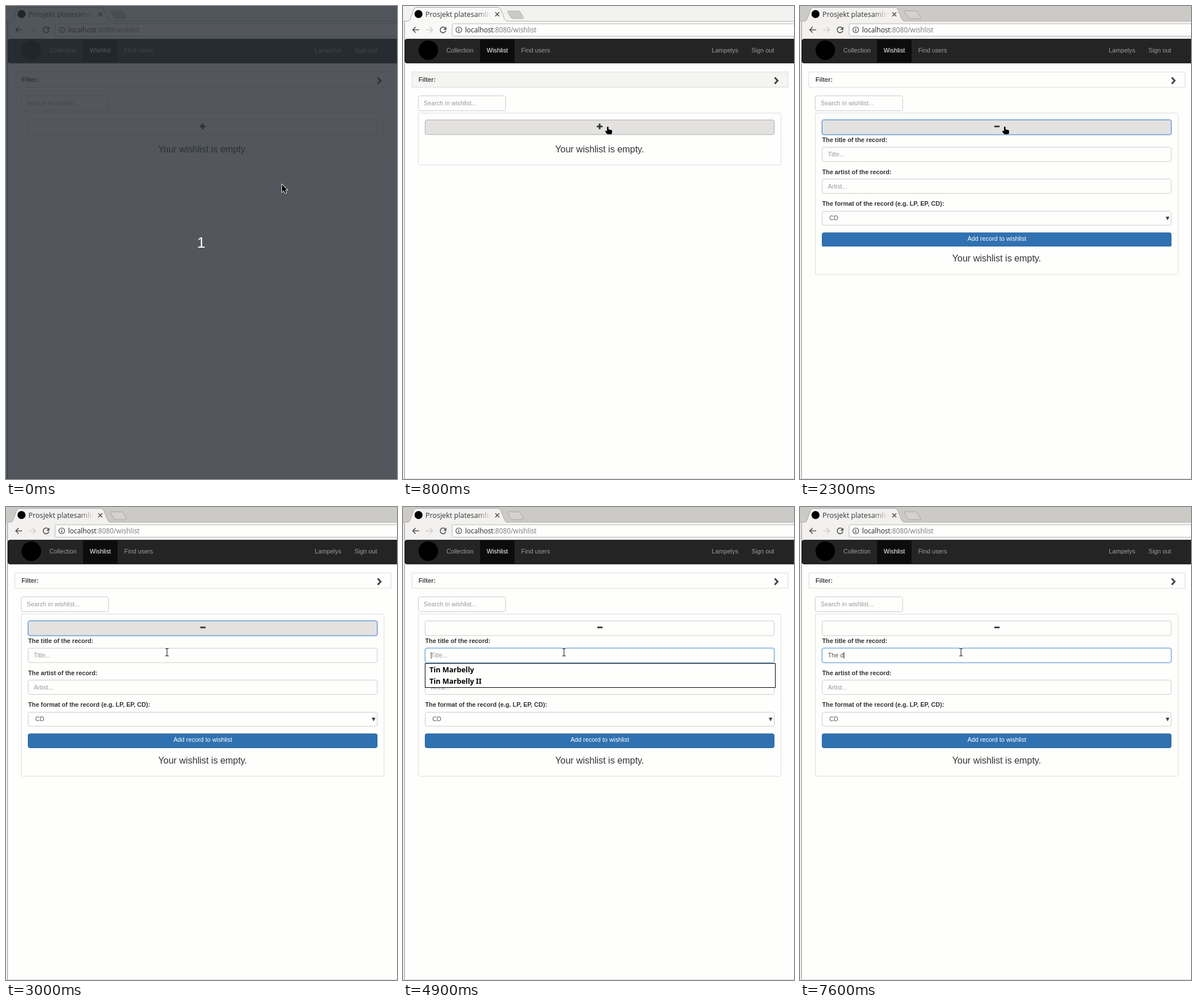
Recreate the animation shown at these times as an HTML page. Size 680 by 824 pixels, loop 8 s.

```html
<!DOCTYPE html>
<html lang="en">
<head>
<meta charset="utf-8">
<title>Wishlist</title>
<style>
  html, body { margin: 0; width: 100%; height: 100%; overflow: hidden; background: #fefefd; }
  svg { display: block; width: 680px; height: 824px; }
  text { font: 10.75px "Liberation Sans", Arial, sans-serif; fill: #9d9d9d; white-space: pre; }
  .mid { text-anchor: middle; }
  .label { font-weight: bold; fill: #333; }
  .value { fill: #555; }
  .hint { fill: #999; }
  .chrome { font-family: "Open Sans", "Noto Sans", sans-serif; }
  .option { font: bold 12.5px "Noto Sans", sans-serif; fill: #000; }
  .box { fill: #fefefd; stroke: #ccc; }
  .panel { fill: #fefefd; stroke: #ddd; }
  .line { fill: none; stroke: #505050; stroke-width: 1.6; }
  #strip { fill: #cbcac7; }
  .bar { fill: #f2f1f0; }
  #newTab { fill: #d3d2d0; stroke: #a8a6a3; }
  .idle #strip { fill: #f2f2f1; }
  .idle .bar { fill: #f8f8f7; }
  .idle #newTab { fill: #cbcac8; stroke: #bab9b7; }
  #filter.hover { fill: #f4f4f3; }
  #toggle.hover { fill: #e3e2e1; stroke: #adadad; }
  #toggle.focus { fill: #e3e2e1; stroke: #5b8bd0; }
  #title.warm { stroke: #a3bddb; }
  #title.focus { stroke: #5f9fd6; }
  .glow { fill: none; stroke: #8fbfea; stroke-width: 3; }
</style>
</head>
<body>
<svg id="stage" viewBox="0 0 680 824">
  <defs>
    <linearGradient id="fade" gradientUnits="userSpaceOnUse" x1="128" x2="153" y1="0" y2="0">
      <stop stop-color="#333"/><stop offset="1" stop-color="#333" stop-opacity="0"/>
    </linearGradient>
    <clipPath id="fold"><rect id="foldBox" x="30" y="228" width="624" height="0"/></clipPath>
  </defs>

  <!-- browser window -->
  <rect width="680" height="824" fill="#fefefd"/>
  <rect id="strip" width="680" height="27"/>
  <rect class="bar" y="27" width="680" height="31"/>
  <path d="M0 26.5H680" stroke="#b4b3b0"/>
  <path class="bar" d="M7 27.5C11 26 12 24 13 21L18.500 6Q19.500 2.500 23 2.500H165Q168.500 2.500 170 6L176 21C177.500 25 179 26.500 183 27.500Z"/>
  <path d="M7 26.500C11 26 12 24 13 21L18.500 6Q19.500 2.500 23 2.500H165Q168.500 2.500 170 6L176 21C177.500 25 179 26 183 26.500" fill="none" stroke="#a9a8a6"/>
  <path id="newTab" d="M183 8.500H201Q203 8.500 204 10.500L209.500 20Q210.500 22 208 22H190.500Q188.500 22 187.500 20L182 10.500Q181 8.500 183 8.500Z"/>
  <circle cx="27" cy="14" r="7"/>
  <text class="chrome" x="39" y="18.500" style="font-size:12.4px;fill:url(#fade)">Prosjekt platesamling</text>
  <path class="line" d="M160.500 11l7 7m0-7l-7 7"/>
  <path class="line" d="M28 41.500H17.500M22 36.500l-5 5 5 5"/>
  <path class="line" d="M40 41.500H51M46.500 36.500l5 5-5 5" style="stroke:#cfcecc"/>
  <path class="line" d="M73.500 38.300A5 5 0 1 0 74.500 43"/>
  <path d="M75.500 36v5.500H70Z" fill="#505050"/>
  <rect x="85.500" y="31" width="620" height="21.500" rx="2.500" fill="#fefefd" stroke="#b9b8b6"/>
  <circle class="line" cx="97" cy="41.500" r="5" style="stroke-width:1.200"/>
  <path class="line" d="M97 40.800v3.700M97 38.300v1.500"/>
  <text class="chrome" x="108" y="45.500" style="font-size:11.750px;fill:#777"><tspan fill="#222">localhost</tspan>:8080/wishlist</text>
  <path d="M2.500 27V824" stroke="#a6a5a4" stroke-width="1.500"/>
  <path d="M3 823.500H680" stroke="#d8d8d7"/>

  <!-- navigation -->
  <rect x="3.500" y="57.800" width="690" height="41.400" rx="3" fill="#242424" stroke="#080808"/>
  <rect x="134" y="58.500" width="60" height="40" fill="#0c0c0c"/>
  <circle cx="44" cy="77" r="17"/>
  <text x="75.500" y="81">Collection</text>
  <text x="145.500" y="81" style="fill:#fff">Wishlist</text>
  <text x="205.500" y="81">Find users</text>
  <text x="537" y="81">Lampelys</text>
  <text x="606" y="81">Sign out</text>

  <!-- page -->
  <rect id="filter" class="panel" x="15.500" y="115" width="654" height="26.500"/>
  <text class="label" x="27" y="132" style="fill:#444">Filter:</text>
  <path d="M646.500 124.500l5 5.500-5 5.500" fill="none" stroke="#444" stroke-width="3"/>
  <rect class="box" x="26.500" y="156.500" width="152" height="26" rx="3"/>
  <text class="hint" x="36" y="173">Search in wishlist...</text>
  <rect id="panel" class="panel" x="26.500" y="186.500" width="631" height="90.500" rx="2"/>
  <rect id="toggleGlow" class="glow" x="38.500" y="198.500" width="607" height="25.500" rx="3" opacity=".5"/>
  <rect id="toggle" class="box" x="38.500" y="198.500" width="607" height="25.500" rx="3"/>
  <path id="plus" d="M337 209.800h10M342 204.800v10" stroke="#333" stroke-width="2.800"/>
  <path id="minus" d="M338 209.800h9" stroke="#333" stroke-width="2.800"/>

  <g clip-path="url(#fold)">
    <text class="label" x="38.500" y="236.700">The title of the record:</text>
    <rect id="titleGlow" class="glow" x="38.500" y="246" width="607" height="25" rx="3" opacity=".4"/>
    <rect id="title" class="box" x="38.500" y="246" width="607" height="25" rx="3"/>
    <text id="entry" x="48.500" y="261.500"></text>
    <rect id="caret" y="253" width="1" height="11" fill="#333"/>
    <text class="label" x="38.500" y="292.700">The artist of the record:</text>
    <rect class="box" x="38.500" y="301.500" width="607" height="25" rx="3"/>
    <text class="hint" x="48.500" y="317.500">Artist...</text>
    <text class="label" x="38.500" y="348">The format of the record (e.g. LP, EP, CD):</text>
    <rect class="box" x="38.500" y="357.500" width="607" height="24.500" rx="3"/>
    <text class="value" x="51" y="373">CD</text>
    <path d="M636 367h6.500l-3.250 6.500Z" fill="#444"/>
    <rect x="38.500" y="395" width="607" height="24.500" rx="3" fill="#3071b1" stroke="#2b669f"/>
    <text class="mid" x="342.300" y="409.300" style="fill:#fff">Add record to wishlist</text>
  </g>
  <text id="empty" class="mid" x="342" y="254.500" style="font-size:15.900px;fill:#333">Your wishlist is empty.</text>

  <g id="options">
    <rect x="38.500" y="272.500" width="609" height="42" fill="#fefefd" stroke="#000"/>
    <text class="option" x="46" y="287.500">Tin Marbelly</text>
    <text class="option" x="46" y="307.700">Tin Marbelly II</text>
  </g>

  <g id="veil">
    <rect width="680" height="824" fill="rgb(40,45,54)" opacity=".8"/>
    <text class="mid" x="339.500" y="421" style="font-size:26px;fill:#fff">1</text>
  </g>

  <!-- pointers, each drawn around its hot spot -->
  <g id="pointer">
    <path id="arrow" d="M0 0V13L3 10.200 5.200 15 7.400 14 5.200 9.400H9.300Z" stroke="#fff" paint-order="stroke" stroke-width="1.600"/>
    <path id="hand" d="M.5 0Q2 0 2 1.500V5L7 6Q8.500 6.500 8.300 8.500L7.500 13.500H-.5L-4 8.500Q-4 7 -2.500 7.300L-.8 8.500V1.500Q-.8 0 .5 0Z" stroke="#fff" paint-order="stroke" stroke-width="1.200"/>
    <g id="beam" fill="none">
      <path d="M-3-6.500H-1L0-5.500 1-6.500H3M0-5.500V5.500M-3 6.500H-1L0 5.500 1 6.500H3" stroke="#fff" stroke-width="2.400"/>
      <path d="M-3-6.500H-1L0-5.500 1-6.500H3M0-5.500V5.500M-3 6.500H-1L0 5.500 1 6.500H3" stroke="#222" stroke-width="1.100"/>
    </g>
  </g>
</svg>
<script>
const LOOP = 8000, STEP = 100, FORM = 192;
const $ = id => document.getElementById(id);
const show = (id, on) => $(id).setAttribute('opacity', +on);
const set = (id, name, value) => $(id).setAttribute(name, value);

// [start, value...] lists; the last entry already begun applies
const moves = [
  [0, 480, 311, 'arrow'], [100, 475, 307, 'arrow'], [200, 442, 277, 'arrow'],
  [300, 405, 246, 'arrow'], [400, 374, 222, 'hand'], [500, 361, 215, 'hand'],
  [600, 357, 212, 'hand'], [800, 355.500, 210, 'hand'], [2400, 306, 235, 'arrow'],
  [2500, 282, 251, 'beam'], [3000, 280, 253, 'beam']
];
const typed = [[0, ''], [5900, 'T'], [6300, 'Th'], [6500, 'The '], [7600, 'The d']];
const blinks = [[0, 0], [3800, 1], [4300, 0], [4900, 1], [5500, 0], [5900, 1], [7100, 0], [7600, 1]];
const listAlpha = [[0, 0], [3900, 1], [5900, .6], [6000, .3], [6100, .08], [6300, 0]];
const at = (list, t) => list.findLast(item => item[0] <= t).slice(1);

// CSS "ease" curve, solved by bisection
function ease(x) {
  if (x <= 0) return 0;
  if (x >= 1) return 1;
  const curve = (a, b, u) => 3 * a * u * (1 - u) ** 2 + 3 * b * u * u * (1 - u) + u ** 3;
  let lo = 0, hi = 1;
  for (let i = 0; i < 20; i++) {
    const mid = (lo + hi) / 2;
    if (curve(.25, .25, mid) < x) lo = mid; else hi = mid;
  }
  return curve(.1, 1, lo);
}

function draw(t) {
  const [x, y, shape] = at(moves, t);
  set('pointer', 'transform', `translate(${x} ${y})`);
  for (const id of ['arrow', 'hand', 'beam']) show(id, id === shape);

  show('veil', t < 100);
  $('stage').classList.toggle('idle', t < 1900);
  $('filter').classList.toggle('hover', t >= 500 && t < 2000);

  const open = t >= 2000, focused = open && t < 3800;
  $('toggle').classList.toggle('hover', t >= 400 && t < 2000);
  $('toggle').classList.toggle('focus', focused);
  show('toggleGlow', focused * .5);
  show('plus', !open);
  show('minus', open);

  const height = FORM * ease((t - 1985) / 350);
  set('foldBox', 'height', height);
  set('panel', 'height', 90.500 + height);
  set('empty', 'y', 254.500 + height);

  $('title').classList.toggle('warm', t >= 3800 && t < 3900);
  $('title').classList.toggle('focus', t >= 3900);
  show('titleGlow', (t >= 3900) * .4);
  const [text] = at(typed, t), entry = $('entry');
  entry.textContent = text || 'Title...';
  entry.setAttribute('class', text ? 'value' : 'hint');
  set('caret', 'x', text ? Math.floor(48.500 + entry.getComputedTextLength()) : 48.500);
  show('caret', at(blinks, t)[0]);
  show('options', at(listAlpha, t)[0]);
}

const start = performance.now();
function tick() {
  const t = (performance.now() - start) % LOOP;
  draw(Math.floor(t / STEP) * STEP);
  requestAnimationFrame(tick);
}
tick();
</script>
</body>
</html>
```
